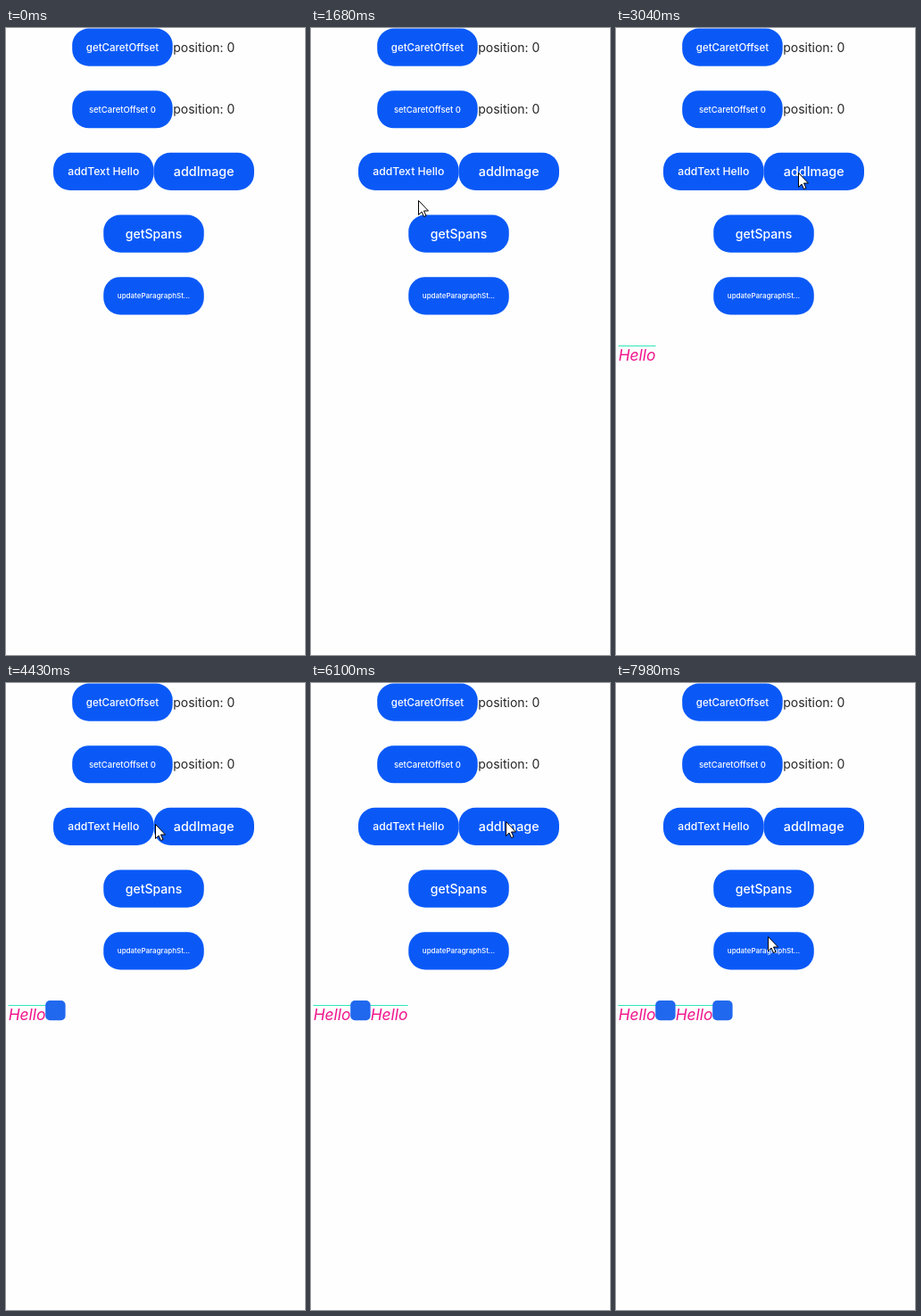
An HTML page for the animation above (8 s loop, 335 by 703 pixels).

```html
<!DOCTYPE html>
<html lang="en">
<head>
<meta charset="utf-8">
<title>Rich editor controls</title>
<style>
  html, body { margin: 0; width: 100%; height: 100%; overflow: hidden; background: #fefefe; }
  svg { display: block; width: 335px; height: 703px; font-family: Inter, Roboto, sans-serif; }
  .button rect { fill: #0a59f7; }
  .button text { fill: #fff; font-weight: 500; text-anchor: middle; }
  .label { fill: #262626; font-size: 14px; }
  .hello { fill: #f0148c; font-size: 17.4px; font-style: italic; }
  .overline { fill: #30e6b8; }
  .icon { fill: #2068ee; }
</style>
</head>
<body>
<svg id="stage" viewBox="0 0 335 703"></svg>
<script>
const LOOP = 8000;
const TICK = 100;
const WIDTH = 112.5;
const HEIGHT = 42.2;
const stage = document.getElementById('stage');

function add(tag, attrs, parent = stage, text = '') {
  const node = document.createElementNS('http://www.w3.org/2000/svg', tag);
  for (const [key, value] of Object.entries(attrs)) node.setAttribute(key, value);
  node.textContent = text;
  parent.append(node);
  return node;
}

function play(node, frames) {
  node.animate(frames, { duration: LOOP, iterations: Infinity });
}

function show(node, from, to = LOOP) {
  const step = (time, opacity) => ({ offset: time / LOOP, opacity, easing: 'step-end' });
  play(node, [step(0, 0), step(from, 1), step(to, 0), step(LOOP, 0)]);
}

// Layout: evenly spaced rows, each centred as a whole
const rowTop = row => 0.5 + 69.67 * row;

function button(row, x, label, size) {
  const y = rowTop(row);
  const group = add('g', { class: 'button' });
  const face = add('rect', { x, y, width: WIDTH, height: HEIGHT, rx: 18.75 }, group);
  add('text', {
    x: x + WIDTH / 2, y: y + HEIGHT / 2 + size * 0.37, 'font-size': size
  }, group, label);
  return face;
}

function press(face, ...times) {
  const step = (time, fill, easing = 'linear') => ({ offset: time / LOOP, fill, easing });
  const normal = '#0a59f7', dark = '#0950de';
  play(face, [
    step(0, normal, 'step-end'),
    ...times.flatMap(time => [
      step(time, dark), step(time + 120, dark), step(time + 260, normal, 'step-end')
    ]),
    step(LOOP, normal)
  ]);
}

const middle = 165.5;
button(0, 74.2, 'getCaretOffset', 11.5);
button(1, 74.2, 'setCaretOffset 0', 9.5);
const addText = button(2, middle - WIDTH, 'addText Hello', 12.2);
const addImage = button(2, middle, 'addImage', 14.3);
button(3, middle - WIDTH / 2, 'getSpans', 14);
button(4, middle - WIDTH / 2, 'updateParagraphSt…', 8);
for (const row of [0, 1]) {
  add('text', { class: 'label', x: 187.2, y: rowTop(row) + 26.3 }, stage, 'position: 0');
}

press(addText, 2400, 5290);
press(addImage, 3670, 6330);

// Editor content: the first image pushes the text line down
const SPAN = 64;
const firstText = 2560, firstImage = 3830, secondText = 5450, secondImage = 6530;

function hello(index, top, from, to) {
  const x = 2.7 + SPAN * index;
  show(add('text', { class: 'hello', x, y: top + 17 }, stage, 'Hello'), from, to);
  const line = { class: 'overline', x: 2.6, y: top, width: 42 + SPAN * index, height: 1 };
  show(add('rect', line), from, to);
}

function icon(index, from) {
  const x = 44.2 + SPAN * index;
  show(add('rect', { class: 'icon', x, y: 356, width: 22.4, height: 22.2, rx: 5 }), from);
}

hello(0, 356, firstText, firstImage);
hello(0, 361, firstImage);
hello(1, 361, secondText);
icon(0, firstImage);
icon(1, secondImage);

// Pointer moves, each from where the last one ended; power above 1 slows towards the end
const moves = [
  { from: 300, to: 900, x: 45, y: 289 },
  { from: 900, to: 1100, x: 74, y: 244 },
  { from: 1200, to: 1700, x: 131, y: 180 },
  { from: 1700, to: 2100, x: 105, y: 163 },
  { from: 2400, to: 3400, x: 223, y: 162, power: 2 },
  { from: 3800, to: 5100, x: 114, y: 155, power: 1.15 },
  { from: 5450, to: 6100, x: 218, y: 155 },
  { from: 6500, to: 7900, x: 170, y: 284 }
];

function pointerAt(time) {
  let x = 0, y = 382;
  for (const move of moves) {
    const progress = Math.min(1, Math.max(0, (time - move.from) / (move.to - move.from)));
    const eased = 1 - (1 - progress) ** (move.power || 1);
    x += (move.x - x) * eased;
    y += (move.y - y) * eased;
  }
  return `translate(${Math.round(x)}px, ${Math.round(y)}px)`;
}

const pointer = add('path', {
  d: 'M.5 .5V16.5L4 13L6.5 18.5L9 17.5L6.5 12H11.5Z', fill: '#fff', stroke: '#000'
});
play(pointer, Array.from({ length: LOOP / TICK + 1 }, (_, i) => ({
  offset: i * TICK / LOOP, transform: pointerAt(i * TICK), easing: 'step-end'
})));
show(pointer, 300);
</script>
</body>
</html>
```
